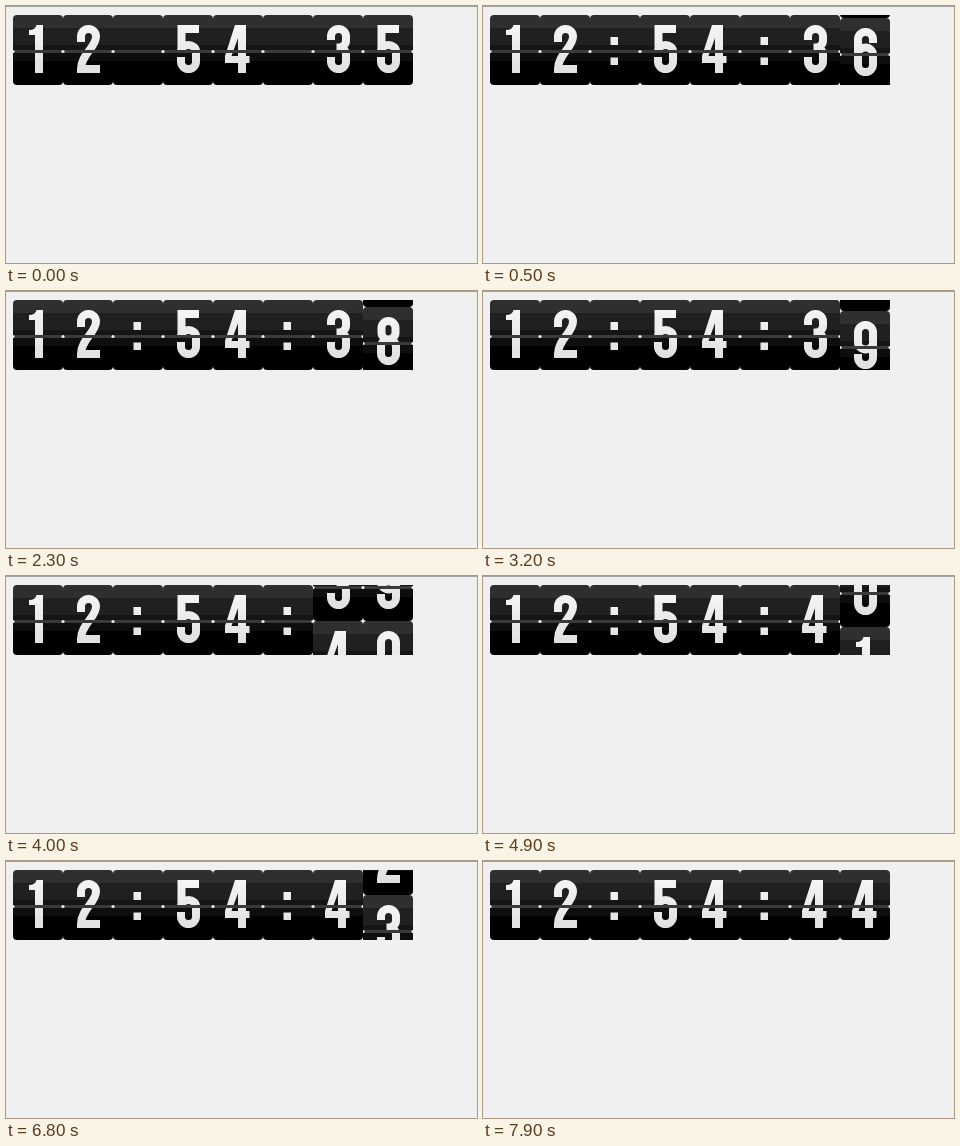
An HTML page with a canvas that plays this animation: 471x257 px, repeating every 8000 ms.

```html
<!DOCTYPE html>
<html lang="en">
<head>
<meta charset="utf-8">
<title>Rolling clock</title>
<style>
  html, body { margin: 0; width: 100%; height: 100%; overflow: hidden; background: #f0f0f0; }
  canvas { display: block; }
</style>
</head>
<body>
<canvas id="stage" width="471" height="257" role="img" aria-label="Clock counting seconds"></canvas>
<script>
const ctx = document.getElementById('stage').getContext('2d');
const BG = '#f0f0f0', LEFT = 7, TOP = 9, W = 50, H = 70;
const LOOP = 8000, STEP = 100, PERIOD = 5500 / 6, FIRST = 1300 - PERIOD;

// Glyphs on a 50 x 70 tile: outlines are stroked, solids are filled.
const outlines = {
  0: 'M18 21.5a7.5 7.5 0 0 1 15 0V46.5a7.5 7.5 0 0 1-15 0Z',
  2: 'M18 27V21.5a7.5 7.5 0 0 1 15 0c0 11-15 18-15 32.5H37',
  3: 'M18 25V21.5a7.5 7.5 0 0 1 15 0v4a7 7 0 0 1-7 7H23.5M26 32.5a7 7 0 0 1 7 7v7a7.5 7.5 0 0 1-15 0V42',
  5: 'M36 14H18.5V37M18 37V36a7.5 6 0 0 1 15 0V46.5a7.5 7.5 0 0 1-15 0V42',
  6: 'M33 25V21.5a7.5 7.5 0 0 0-15 0V46.5a7.5 7.5 0 0 0 15 0V36.5a7.5 7 0 0 0-15 0',
  8: 'M25.5 14a7 7 0 0 1 7 7v4.5a7 7 0 0 1-14 0V21a7 7 0 0 1 7-7Z' +
     'M25.5 32.5a7.5 7.5 0 0 1 7.5 7.5v6.5a7.5 7.5 0 0 1-15 0V40a7.5 7.5 0 0 1 7.5-7.5Z',
  9: 'M18 43v3.5a7.5 7.5 0 0 0 15 0V21.5a7.5 7.5 0 0 0-15 0V31.5a7.5 7 0 0 0 15 0'
};
const solids = {
  1: 'M23.5 10H30V58H22V20H16V15Q22.5 15 23.5 10Z',
  4: 'M22 10H33V41H36.5V48H33V58H25V48H12V41ZM25 41V23L18.5 41Z',
  7: 'M14 10H37V18L28 58H19.5L28.5 18H14Z',
  ':': 'M20.5 22H28V30H20.5ZM20.5 42.5H28V50H20.5Z'
};
const toPaths = set => Object.fromEntries(
  Object.entries(set).map(([key, d]) => [key, new Path2D(d)]));
const strokes = toPaths(outlines), fills = toPaths(solids);

const bands = [[0, 13, '#2f2f2f'], [13, 30, '#202020'], [30, 35, '#151515'],
               [35, 46, '#0e0e0e'], [46, H, '#000']];
const ink = ctx.createLinearGradient(0, 10, 0, 58);
ink.addColorStop(0, '#f5f5f5');
ink.addColorStop(1, '#e0e0e0');

function drawTile(x, y, char) {
  ctx.save();
  ctx.translate(x, y);
  ctx.beginPath();
  ctx.roundRect(0, 0, W, H, 4);
  ctx.clip();
  for (const [from, to, color] of bands) {
    ctx.fillStyle = color;
    ctx.fillRect(0, from, W, to - from);
  }
  ctx.fillStyle = ctx.strokeStyle = ink;
  ctx.lineWidth = 8;
  if (strokes[char]) ctx.stroke(strokes[char]);
  if (fills[char]) ctx.fill(fills[char], 'evenodd');
  ctx.fillStyle = '#3a3a3a';
  ctx.fillRect(0, 35, W, 3);
  ctx.fillStyle = BG;
  for (const edge of [0, W]) {
    ctx.beginPath();
    ctx.arc(edge, 36.5, 1.6, 0, Math.PI * 2);
    ctx.fill();
  }
  ctx.restore();
}

// Distance still to travel, by time around each tick.
const roll = [[-95, 70], [-83.4, 48], [-50, 36], [0, 25], [83.4, 7], [140, 0]];
function remaining(time) {
  if (time <= roll[0][0]) return H;
  for (let i = 1; i < roll.length; i++) {
    const [t0, d0] = roll[i - 1], [t1, d1] = roll[i];
    if (time <= t1) return Math.round(d0 + (d1 - d0) * (time - t0) / (t1 - t0));
  }
  return 0;
}

function drawSlot(index, before, after, gap) {
  const x = LEFT + index * W;
  if (before === after || gap === 0) return drawTile(x, TOP, after);
  ctx.save();
  ctx.beginPath();
  ctx.rect(x, TOP, W, H);
  ctx.clip();
  drawTile(x, TOP + gap - H, before);
  drawTile(x, TOP + gap, after);
  ctx.restore();
}

function render(t) {
  const tick = Math.floor((t - FIRST + 95) / PERIOD);
  const phase = t - FIRST - tick * PERIOD;
  const colon = t < STEP || (phase > 190 && phase < 375 && tick >= 0) ? ' ' : ':';
  const face = seconds => `12${colon}54${colon}${seconds}`;
  const after = face(36 + tick);
  const before = tick < 0 ? after : face(35 + tick);
  const gap = remaining(phase);

  ctx.fillStyle = BG;
  ctx.fillRect(0, 0, 471, 257);
  ctx.fillStyle = '#a3a3a3';
  ctx.fillRect(0, 0, 471, 1);
  for (let i = 0; i < after.length; i++) drawSlot(i, before[i], after[i], gap);
}

const start = performance.now();
function loop() {
  const t = (performance.now() - start) % LOOP;
  render(Math.floor(t / STEP) * STEP);
  requestAnimationFrame(loop);
}
loop();
</script>
</body>
</html>
```
